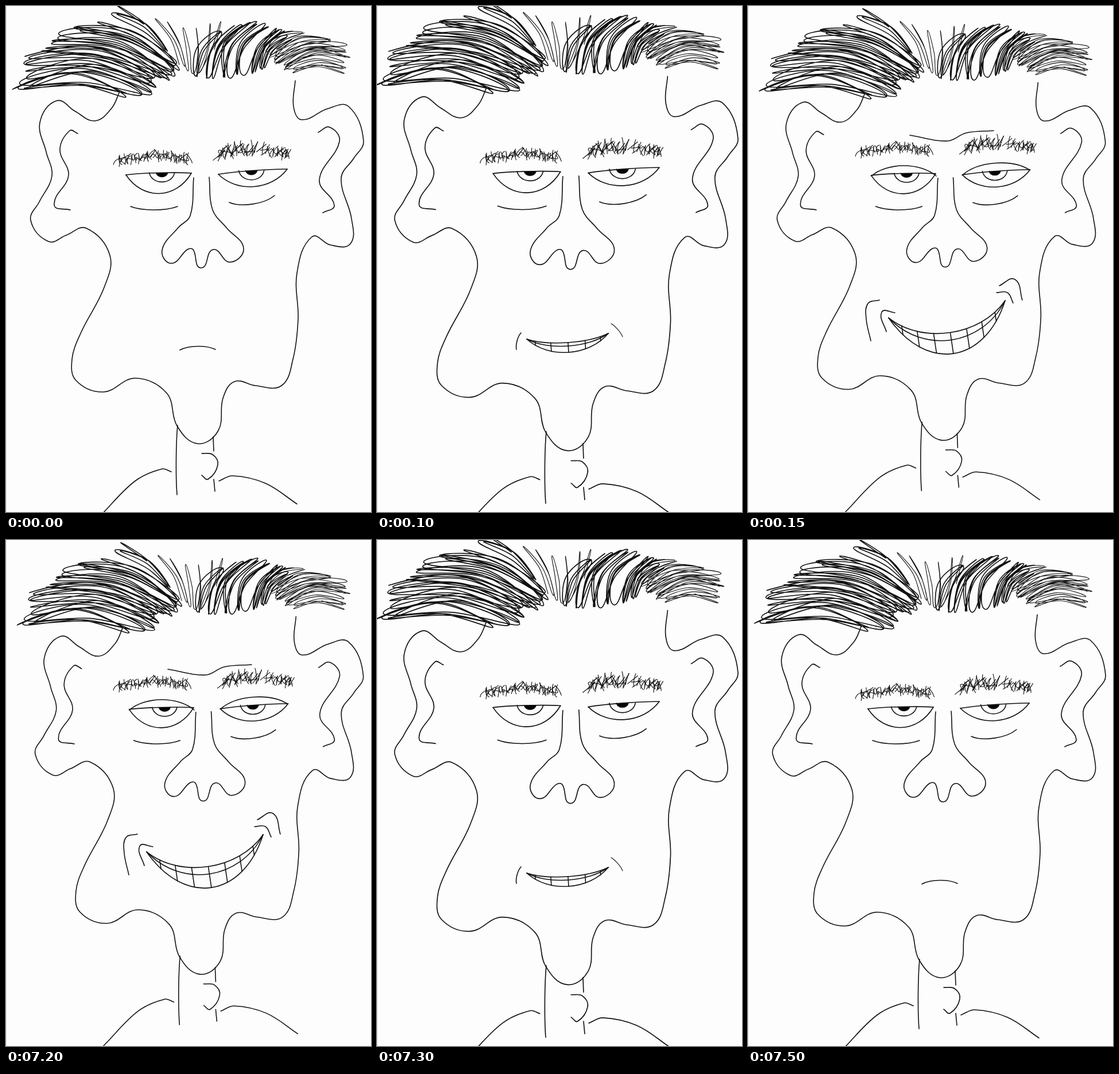
An HTML page for the animation above (8.5 s loop, 636 by 881 pixels).

```html
<!DOCTYPE html>
<html lang="en">
<head>
<meta charset="utf-8">
<title>Growing grin</title>
<style>
  html, body { margin: 0; width: 100%; height: 100%; overflow: hidden; background: #fdfdfd; }
  svg { display: block; width: 100%; height: 100%; }
  path, circle { fill: none; stroke: #111; stroke-width: 1.6; stroke-linecap: round; stroke-linejoin: round; }
  .thin { stroke-width: 1.1; }
  .ink { fill: #050505; }
</style>
</head>
<body>
<svg id="stage" viewBox="0 0 636 881">
  <rect width="1" height="881" fill="#e6e6e6"/>
</svg>
<script>
const NS = 'http://www.w3.org/2000/svg';
const stage = document.getElementById('stage');

function add(parent, tag, attrs = {}) {
  const el = document.createElementNS(NS, tag);
  for (const k in attrs) el.setAttribute(k, attrs[k]);
  parent.appendChild(el);
  return el;
}
const group = parent => add(parent, 'g');
const stroke = (g, d, cls = '') => add(g, 'path', { d, class: cls });
const circle = (g, cx, cy, r, cls = '') => add(g, 'circle', { cx, cy, r, class: cls });
const line = (g, ...p) => stroke(g, 'M' + p.map(q => q.map(v => v.toFixed(1))).join('L'));
const parse = s => s.trim().split(/\s+/).map(p => p.split(',').map(Number));
const plus = (a, b, k = 1) => [a[0] + b[0] * k, a[1] + b[1] * k];

function random(seed) {
  return () => (seed = (seed * 16807) % 2147483647) / 2147483647;
}

// Smooth curve through a few key points; handles follow the neighbour chord
function spline(p) {
  const handle = (i, len) => {
    const a = p[Math.max(i - 1, 0)], c = p[Math.min(i + 1, p.length - 1)];
    const chord = Math.hypot(c[0] - a[0], c[1] - a[1]) || 1;
    const k = Math.min(0.36 * len, 0.4 * chord) / chord;
    return [(c[0] - a[0]) * k, (c[1] - a[1]) * k];
  };
  let d = 'M' + p[0];
  for (let i = 0; i < p.length - 1; i++) {
    const b = p[i], c = p[i + 1], len = Math.hypot(c[0] - b[0], c[1] - b[1]);
    const nodes = [plus(b, handle(i, len)), plus(c, handle(i + 1, len), -1), c];
    d += 'C' + nodes.flat().map(v => v.toFixed(1)).join(' ');
  }
  return d;
}
const curve = (g, s, cls) => stroke(g, spline(parse(s)), cls);

// One arc between two ends; sag is its depth, inset sets how boxy it is
function bowNodes(x1, y1, x2, y2, sag, inset = 0.25) {
  const dx = x2 - x1, dy = y2 - y1, k = sag * 4 / 3 / Math.hypot(dx, dy);
  const node = t => [x1 + dx * t - dy * k, y1 + dy * t + dx * k];
  return [[x1, y1], node(inset), node(1 - inset), [x2, y2]];
}
function bow(g, x1, y1, x2, y2, sag, cls, inset) {
  const [a, ...rest] = bowNodes(x1, y1, x2, y2, sag, inset);
  return stroke(g, `M${a}C${rest.join(' ')}`, cls);
}
function onBow([a, b, c, d], t) {
  const u = 1 - t;
  return [0, 1].map(j => u * u * u * a[j] + 3 * u * u * t * b[j] + 3 * u * t * t * c[j] + t * t * t * d[j]);
}

// Point at share t of a polyline
function at(p, t) {
  const u = Math.min(Math.max(t, 0), 1) * (p.length - 1), i = Math.min(Math.floor(u), p.length - 2);
  return [0, 1].map(j => p[i][j] + (p[i + 1][j] - p[i][j]) * (u - i));
}

// Pen running back and forth between a row of roots and a row of tips
function scribble(g, rootRow, tipRow, n, bend, jitter, seed, cls) {
  const roots = parse(rootRow), tips = parse(tipRow), rnd = random(seed), out = [];
  const pick = (row, t) => at(row, t + (rnd() - 0.5) * 0.1).map(v => v + (rnd() - 0.5) * jitter);
  const mid = (a, b) => {
    const k = bend * (0.3 + rnd() * 1.2);
    return [(a[0] + b[0]) / 2 - (b[1] - a[1]) * k, (a[1] + b[1]) / 2 + (b[0] - a[0]) * k];
  };
  let root = roots[0];
  for (let i = 0; i < n; i++) {
    const tip = i ? pick(tips, i / (n - 1)) : tips[0];
    const next = pick(roots, (i + 1) / n);
    out.push(root, mid(root, tip), tip, mid(next, tip));
    root = next;
  }
  stroke(g, spline(out), cls);
}

// Short curled hairs along a centre line
function brow(g, row, n, half, seed) {
  const c = parse(row), rnd = random(seed), core = [];
  for (let i = 0; i < n; i++) {
    const [x, y] = at(c, i / (n - 1));
    const lean = (rnd() - 0.6) * 1.5, len = half * (0.6 + rnd() * 0.5), cy = y + (rnd() - 0.5) * 6;
    const dx = Math.sin(lean) * len, dy = Math.cos(lean) * len;
    bow(g, x - dx, cy - dy, x + dx, cy + dy, (rnd() - 0.3) * 5, 'thin');
    core.push([x + (rnd() - 0.5) * 8, y + (rnd() - 0.5) * half]);
  }
  stroke(g, spline(core), 'thin');
}

// ---- Head ----
const base = group(stage);

curve(base, `198,149 184,178 155,200 120,183 88,165 59,203 70,254 80,296 58,341 43,373 74,410 105,399
  140,387 181,434 171,490 130,570 115,615 122,652 170,672 225,648 280,674 298,731 334,762 370,739
  378,683 398,654 435,661 480,661 500,615 509,545 507,465 533,402 565,416 600,414 602,370 584,300
  606,265 623,235 597,175 560,179 515,198 501,175 504,130`);
curve(base, '125,222 111,217 94,250 109,295 84,346 112,355');
curve(base, '544,220 564,211 581,236 546,303 572,347 552,360');
curve(base, `327,299 321,365 300,386 272,425 288,448 316,424 326,424 340,456 361,424 390,446 414,422
  385,387 360,355 354,298`);
// neck and shoulders
bow(base, 299, 730, 298, 851, 2);
bow(base, 361, 750, 362, 775, 0);
bow(base, 362, 824, 364, 845, 0);
curve(base, '341,779 360,781 369,799 352,824 341,817');
curve(base, '288,811 272,806 225,827 164,888');
curve(base, '371,827 395,818 452,831 507,867');

// hair: left, middle, right, far right
scribble(base, '210,152 256,150 256,122 292,125 300,105 270,72', '11,145 40,135 28,98 72,72 92,50 140,33 198,3',
  24, 0.13, 12, 41);
scribble(base, '302,102 330,118 337,118', '260,22 288,32 320,38 350,32 374,27', 6, 0.06, 5, 15, 'thin');
scribble(base, '333,123 378,123 424,121 462,104', '375,44 432,27 470,38 495,55', 18, -0.17, 8, 23);
scribble(base, '455,75 470,100 505,115', '500,44 560,58 590,72 595,95 588,112', 16, -0.14, 12, 61, 'thin');

// brows
const browL = group(base), browR = group(base);
brow(browL, '194,269 225,264 258,260 290,262 319,267', 42, 9, 13);
brow(browR, '371,258 400,249 434,250', 23, 13, 29);
brow(browR, '445,250 475,254 492,259', 18, 10, 53);

// sleepy eyes: flat lid, half iris, half pupil
const sleepy = group(base);
function sleepyEye(x1, y1, x2, y2, depth, look) {
  const cx = x1 + (x2 - x1) * look, cy = y1 + (y2 - y1) * look - 2;
  bow(sleepy, x1, y1, x2, y2, -2);
  bow(sleepy, x1, y1, x2, y2, depth);
  bow(sleepy, cx - 22, cy, cx + 22, cy, 16, '', 0.1);
  bow(sleepy, cx - 10, cy, cx + 10, cy, 7, 'ink', 0.1);
}
sleepyEye(209, 294, 323, 291, 34, 0.55);
sleepyEye(370, 293, 490, 284, 26, 0.48);
bow(sleepy, 217, 349, 299, 349, 6);
bow(sleepy, 389, 342, 468, 330, 9);

// ---- Expressions ----
// Curved mouth with a row of upright teeth marks
function toothy(g, ends, top, middle, bottom, n) {
  [top, middle, bottom].forEach(sag => bow(g, ...ends, sag));
  const upper = bowNodes(...ends, top), lower = bowNodes(...ends, bottom);
  for (let i = 0; i < n; i++) {
    const t = 0.12 + 0.76 * i / (n - 1);
    line(g, onBow(upper, t), onBow(lower, t));
  }
}

const calm = group(stage);
bow(calm, 303, 599, 365, 598, -6);

const hint = group(stage);
bow(hint, 284, 588, 384, 583, 11);

const smile = group(stage);
toothy(smile, [261, 580, 403, 570], 11, 17, 28, 5);
bow(smile, 251, 569, 243, 598, 3);
bow(smile, 408, 553, 428, 576, -2, 'thin');

const grin = group(stage);
toothy(grin, [245, 543, 448, 513], 41, 54, 78, 7);
bow(grin, 215, 296, 328, 296, -18);
bow(grin, 374, 294, 490, 285, -16);
curve(grin, '282,225 348,235 380,221 428,217');
curve(grin, '229,512 209,518 206,545 214,583');
curve(grin, '256,534 233,533 241,567');
curve(grin, '438,487 465,476 478,512');
curve(grin, '433,499 452,499 462,517');

const wild = group(stage);
// wrinkles: wavy rows, then folds above the nose
function wave(g, x1, y1, x2, y2) {
  const out = [];
  for (let i = 0; i <= 8; i++) {
    const t = i / 8;
    out.push([x1 + (x2 - x1) * t, y1 + (y2 - y1) * t + 3 * Math.sin(t * 11 + Math.PI)]);
  }
  stroke(g, spline(out));
}
wave(wild, 197, 180, 473, 172);
wave(wild, 213, 190, 419, 188);
wave(wild, 216, 201, 407, 193);
wave(wild, 233, 219, 398, 209);
bow(wild, 300, 222, 392, 214, 9);
bow(wild, 303, 231, 380, 226, 19);
bow(wild, 313, 241, 362, 250, 6);
bow(wild, 330, 252, 362, 250, 11);

function wideEye(x1, y1, x2, y2, up, down, cx, cy, r) {
  bow(wild, x1, y1, x2, y2, -up);
  bow(wild, x1, y1, x2, y2, down);
  circle(wild, cx, cy, r);
  circle(wild, cx, cy + 1, r * 0.46, 'ink');
}
wideEye(209, 287, 331, 290, 33, 36, 273, 283, 24);
wideEye(374, 294, 498, 287, 40, 25, 435, 283, 25);
bow(wild, 207, 322, 317, 318, 14);
bow(wild, 217, 349, 314, 337, 13);
bow(wild, 372, 330, 473, 331, 15);
bow(wild, 378, 314, 475, 321, 4, 'thin');

// crow's feet
for (let i = 0; i < 6; i++) {
  line(wild, [181, 268 + i * 6], [203, 276 + i * 3.6]);
  line(wild, [495 + i, 267 + i * 4], [515 + 8 * Math.sin(i * 0.6), 253 + i * 7.6]);
}
line(wild, [188, 268], [185, 300]);
line(wild, [194, 272], [191, 297]);

// mouth and cheeks
const lips = [202, 447, 472, 466];
bow(wild, ...lips, 66);
bow(wild, ...lips, 188, '', -0.08);
curve(wild, '216,431 203,434 182,465 181,508');
curve(wild, '216,441 202,444 188,475 182,511');
curve(wild, '449,433 482,440 505,481');
curve(wild, '458,448 482,450 495,495 507,530');

// Block tooth: root corner, width, height (negative stands up), tilt in degrees
function tooth(x, y, w, h, deg) {
  const a = deg * Math.PI / 180, cos = Math.cos(a), sin = Math.sin(a);
  const root = [x, y], across = [w * cos, w * sin];
  const tip = plus(root, [-h * sin, h * cos]);
  const root2 = plus(root, across), tip2 = plus(tip, across);
  const back = [w / 5, -w / 7];
  line(wild, root, tip, tip2, root2);
  line(wild, tip2, plus(tip2, back), plus(root2, [w / 6, 0]));
  if (h < 0) line(wild, tip, plus(tip, back, 1.3), plus(tip2, back));
}
[[298, 521, 41, 46, 12], [358, 524, 33, 41, -8], [245, 503, 28, 33, 18], [417, 510, 20, 31, -24],
 [448, 507, 16, 18, -8], [200, 496, 25, 24, -20], [205, 465, 14, 20, -14],
 [336, 642, 36, -30, -3], [222, 594, 46, -38, 42], [427, 613, 22, -45, -14]].forEach(t => tooth(...t));
circle(wild, 313, 541, 12);
circle(wild, 314, 540, 9.5);

// ---- Poses: head zoom and shift, brow offsets, visible parts ----
const poses = {
  calm:  { head: [1, 0, 0],             l: [0, 0],     r: [0, 0],     on: [calm, sleepy] },
  hint:  { head: [1.015, -6.6, -5.8],   l: [0, 0],     r: [0, 0],     on: [hint, sleepy] },
  smile: { head: [1.031, -13.3, -11.5], l: [0, 0],     r: [0, 0],     on: [smile, sleepy] },
  grin:  { head: [0.9856, 8.6, 5.1],    l: [-6, -16],  r: [4.5, -12], on: [grin, sleepy] },
  wild:  { head: [1.0195, -3.8, -6.8],  l: [-20, -27], r: [5, -21],   on: [wild] }
};
const steps = [[0, 'calm'], [50, 'hint'], [100, 'smile'], [150, 'grin'], [200, 'wild'],
  [7200, 'grin'], [7300, 'smile'], [7400, 'hint'], [7500, 'calm']];
const LOOP = 8500;
const parts = [calm, hint, smile, grin, wild, sleepy];
let shown = '';

function draw(ms) {
  const name = steps.filter(s => s[0] <= ms % LOOP).pop()[1];
  if (name === shown) return;
  shown = name;
  const { head: [k, x, y], l, r, on } = poses[name];
  base.setAttribute('transform', `translate(${x} ${y}) scale(${k})`);
  browL.setAttribute('transform', `translate(${l})`);
  browR.setAttribute('transform', `translate(${r})`);
  parts.forEach(p => p.setAttribute('display', on.includes(p) ? 'inline' : 'none'));
}

const start = performance.now();
function tick() {
  draw(performance.now() - start);
  requestAnimationFrame(tick);
}
draw(0);
requestAnimationFrame(tick);
</script>
</body>
</html>
```
